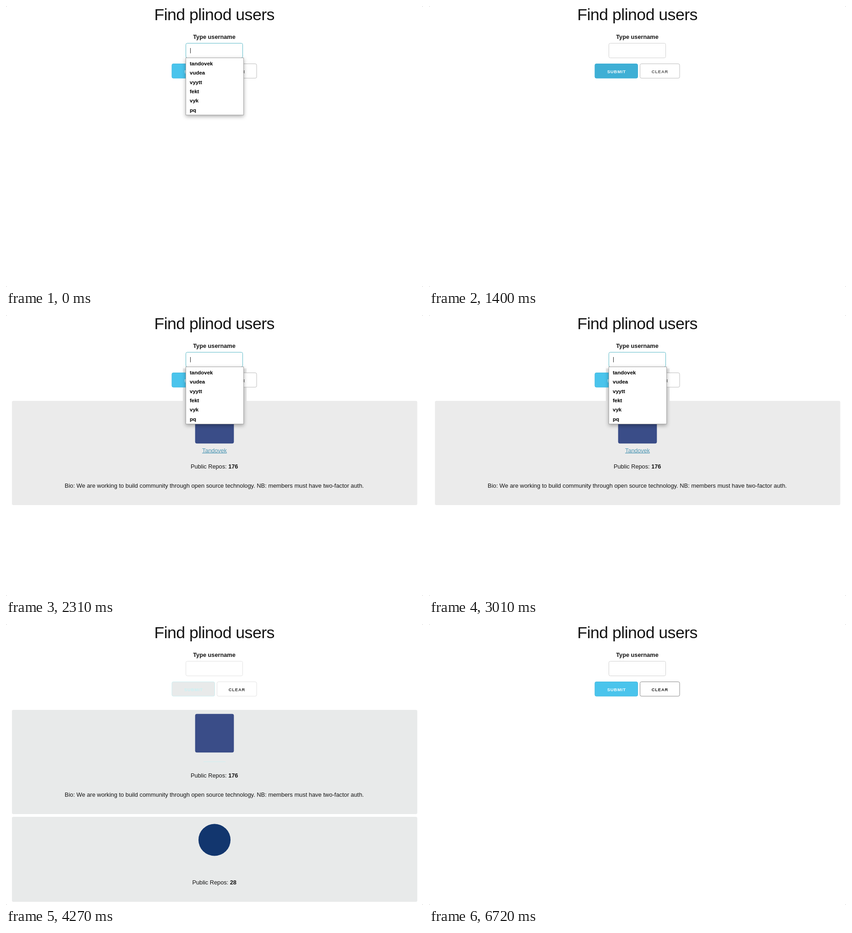
An HTML page that plays this animation: 910 by 615 pixels, repeating every 6.79 s.

```html
<!DOCTYPE html>
<html lang="en">
<head>
<meta charset="utf-8">
<title>Find users</title>
<style>
  html, body { margin: 0; width: 100%; height: 100%; overflow: hidden; background: #999; }
  svg { display: block; width: 910px; height: 615px;
    font: 12.75px "Liberation Sans", Arial, sans-serif; --card: #ebebeb; --link: #5299b5; }
  text { fill: #141414; white-space: pre; }
  .mid { text-anchor: middle; }
  .bold { font-weight: bold; }
  .title { font-size: 35.7px; letter-spacing: -.55px; }
  .button { font-size: 9.35px; font-weight: bold; letter-spacing: .85px; }
  .card { fill: var(--card); }
  .bio { font-size: 12.87px; }
  .link { fill: var(--link); text-decoration: underline; letter-spacing: -.1px; }
  .list { font-size: 11.5px; font-weight: bold; }
  .list text { fill: #000; }
  .list rect { fill: #fff; stroke: #a5a5a5; filter: drop-shadow(0 3px 4px rgba(0, 0, 0, .32)); }
  .typed { font-size: 10px; }
  .spell { stroke: #e0563c; stroke-dasharray: 1.5 1; }
  .caret { stroke: #222; }
  #field { fill: #fff; stroke: #d1d1d1; }
  #submit { fill: #4ac4ec; stroke: #45b9df; }
  #submitText { fill: #fff; }
  #clear { fill: #fff; stroke: #bbb; }
  #clearText { fill: #555; }
  #halo { fill: #ebebeb; }
  #faintLine { stroke: #d0f0f2; }

  .focus #field { stroke: #5bb9c8; }
  .over #submit { fill: #3eafd5; stroke: #3eafd5; }
  .second { --card: #ebebea; --link: #3eaad0; }
  .second #field { fill: #ebebea; stroke: #7cc0b4; }
  .pale { --card: #e8eaea; }
  .pale #clearText { fill: #333; }
  .overClear #clear { stroke: #888; }
  .overClear #clearText { fill: #1c1c1c; }
  .pale #field, .pale #clear { fill: #fff; stroke: #e2e2e2; }
  .pale #submit { fill: #e8eaea; stroke: #cdeff2; }
  .pale #submitText { fill: #c8f2f5; }
</style>
</head>
<body>
<svg id="stage" viewBox="0 0 910 615">
  <rect width="910" height="615" rx="2" fill="#fff"/>
  <rect id="halo" x="386" y="117" width="139" height="72"/>
  <text class="title" x="323.4" y="31.3">Find plinod users</text>
  <text class="mid bold" x="454.5" y="72">Type username</text>

  <rect id="field" x="392.5" y="81.5" width="124" height="32" rx="3.2"/>
  <text id="typed" class="typed" x="402" y="102"></text>
  <path id="spell" class="spell"/>
  <path id="caret" class="caret"/>

  <rect id="submit" x="362" y="126.5" width="93.5" height="31.5" rx="3.2"/>
  <text id="submitText" class="mid button" x="409.4" y="146.5">SUBMIT</text>
  <rect id="clear" x="460.5" y="126.5" width="86.5" height="31.5" rx="3.2"/>
  <text id="clearText" class="mid button" x="503.9" y="146.5">CLEAR</text>

  <g id="cardA">
    <rect class="card" x="13" y="188" width="884.5" height="228" rx="3"/>
    <rect x="412.7" y="196.7" width="84.6" height="84.6" rx="4" fill="#3a4d88"/>
    <text id="link" class="mid link" x="455" y="300.5">Tandovek</text>
    <path id="faintLine" d="M431 301.5H479"/>
    <text class="mid" x="454.7" y="336">Public Repos: <tspan class="bold">176</tspan></text>
    <text class="mid bio" x="454.5" y="378">Bio: We are working to build community through open source technology. NB: members must have two-factor auth.</text>
  </g>
  <g id="cardB">
    <rect class="card" x="13" y="422" width="884.5" height="186" rx="3"/>
    <circle cx="455" cy="472.5" r="35" fill="#12366e"/>
    <text class="mid" x="454.7" y="570">Public Repos: <tspan class="bold">28</tspan></text>
  </g>

  <g id="list" class="list">
    <rect x="392.5" y="113.5" width="126" height="125"/>
  </g>
</svg>
<script>
const LOOP = 6790, STEP = 70;
const $ = id => document.getElementById(id);
const stage = $("stage");

["tandovek", "vudea", "vyytt", "fekt", "vyk", "pq"].forEach((name, i) => {
  const row = document.createElementNS(stage.namespaceURI, "text");
  row.setAttribute("x", 401);
  row.setAttribute("y", 129.7 + 20.4 * i);
  row.textContent = name;
  $("list").append(row);
});

const show = (id, on) => { $(id).style.display = on ? "" : "none"; };

function draw(now) {
  const t = Math.floor(now % LOOP / STEP) * STEP;
  const within = (from, to) => t >= from && t < to;
  const second = within(3080, 4130);
  const pale = within(4270, 6160);
  const focus = within(0, 1260) || within(2170, 4130);
  const states = {
    focus, second, pale,
    over: within(910, 1820) || within(3360, 4270),
    overClear: t >= 5670
  };
  for (const name in states) stage.classList.toggle(name, states[name]);

  show("list", within(0, 560) || within(2240, 3080));
  show("halo", within(2240, 3080));
  show("cardA", within(1610, 6160));
  show("cardB", pale);
  show("link", !pale);
  show("faintLine", pale);
  show("caret", focus);
  show("spell", second);

  $("typed").textContent = within(560, 1260) ? "tandovek" : second ? "vudea" : "";
  const end = 402 + $("typed").getComputedTextLength();
  $("caret").setAttribute("d", `M${Math.round(end) + .5} 92V103.5`);
  $("spell").setAttribute("d", `M402 103.5H${end}`);
  requestAnimationFrame(() => draw(performance.now()));
}
draw(performance.now());
</script>
</body>
</html>
```
